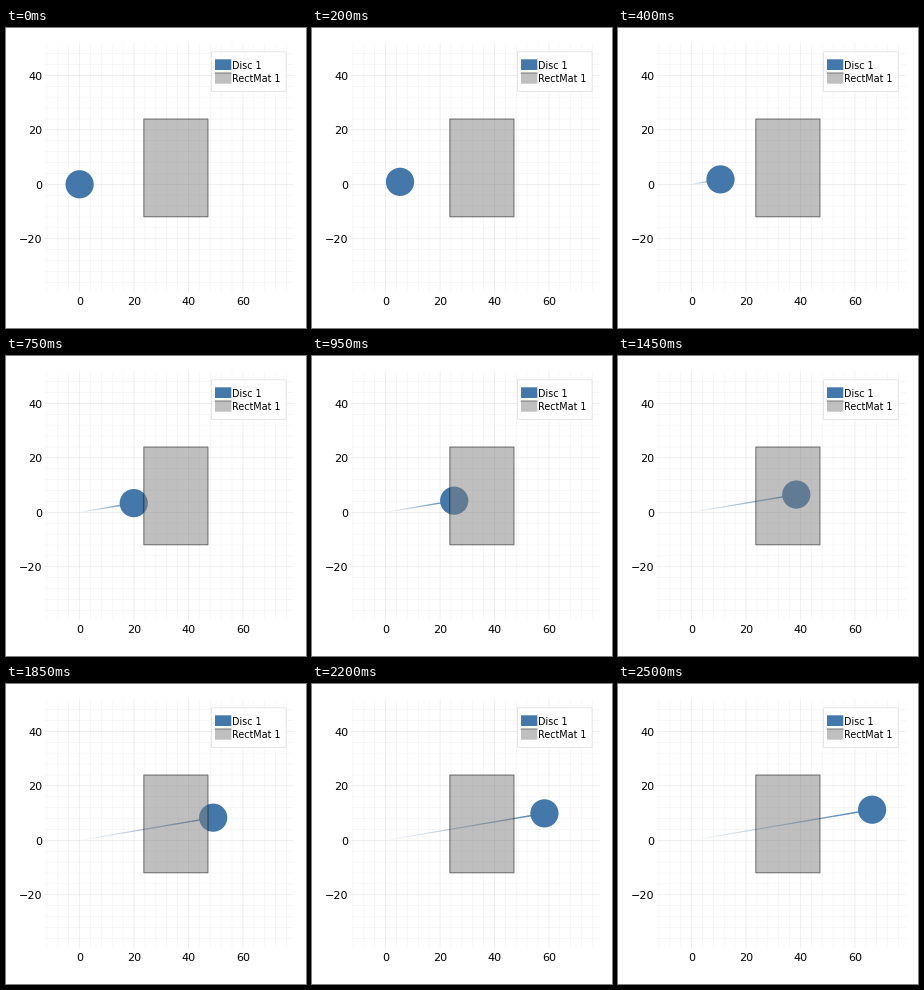
Write a matplotlib script that moves like this. It is 300 px wide and 300 px high and loops after 2550 ms.

```python
import numpy as np
import matplotlib.pyplot as plt
from matplotlib.animation import FuncAnimation
from matplotlib.collections import LineCollection
from matplotlib.patches import Circle, Rectangle

FRAMES, INTERVAL = 51, 50
PT = 0.72                       # points per pixel at 100 dpi
X0, Y0, UNIT = 73.6, 156.3, 2.722
STEP = np.array([3.61, -0.612])  # disc travel per frame, pixels
BLUE = "#4477AA"

plt.rcParams["font.family"] = "DejaVu Sans"
fig = plt.figure(figsize=(3, 3), dpi=100, facecolor="white")
ax = fig.add_axes([0, 0, 1, 1])
ax.set_xlim(0, 300)
ax.set_ylim(300, 0)
ax.axis("off")


def px(x):
    return X0 + UNIT * x


def py(y):
    return Y0 - UNIT * y


def line(xs, ys, color, width, **kw):
    ax.plot(xs, ys, color=color, lw=width * PT, solid_capstyle="butt",
            snap=False, **kw)


def label(x, y, text, size, ha):
    ax.text(x, y, text, fontsize=size * PT, ha=ha, va="baseline", zorder=8)


def box(x, y, w, h, **kw):
    ax.add_patch(Rectangle((x, y), w, h, snap=False, **kw))


# Grid: minor lines every 4 units, major every 20
for k in range(-3, 20):
    shade = 0.1 if k % 5 == 0 else 0.05
    line([px(4 * k)] * 2, [15, 264], "black", 0.6, alpha=shade, zorder=1)
for k in range(-9, 13):
    shade = 0.1 if k % 5 == 0 else 0.05
    line([39, 288], [py(4 * k)] * 2, "black", 0.6, alpha=shade, zorder=1)

for v in (0, 20, 40, 60):
    label(px(v), 277, str(v), 11.1, "center")
for v in (-20, 0, 20, 40):
    label(36.3, py(v) + 4.3, str(v).replace("-", "\u2212"), 11.1, "right")

# Moving parts
trail = LineCollection([], capstyle="butt", zorder=2)
ax.add_collection(trail)
disc = Circle((X0, Y0), 14.1, facecolor=BLUE, edgecolor="none", zorder=3)
ax.add_patch(disc)

# Translucent block over the disc
box(137.8, 91, 64.2, 97.8, facecolor=(0.5, 0.5, 0.5, 0.5),
    edgecolor=(0, 0, 0, 0.5), lw=PT, joinstyle="miter", zorder=4)

# Legend
box(205.5, 23.8, 74.6, 39.6, facecolor="white", edgecolor="#e4e4e4",
    lw=0.9 * PT, zorder=6)
box(209, 31.3, 16.3, 10.7, facecolor=BLUE, edgecolor="none", zorder=7)
box(209, 45, 16.3, 10.7, facecolor="#bfbfbf", edgecolor="none", zorder=7)
line([208.7, 225.5], [45, 45], "#777777", 1, zorder=7)
label(226.5, 40.8, "Disc 1", 9.7, "left")
label(226.5, 54.2, "RectMat 1", 9.7, "left")


def update(i):
    start = np.array([X0, Y0])
    path = start + np.arange(i + 1)[:, None] * STEP
    disc.center = path[-1]
    ramp = np.arange(1, i + 1) / max(i, 1)
    trail.set_segments(list(np.stack([path[:-1], path[1:]], axis=1)))
    trail.set_linewidths((0.8 + 0.7 * ramp) * PT if i else [0])
    rgb = np.array([0x44, 0x77, 0xAA]) / 255
    trail.set_color([(*rgb, a) for a in ramp])
    return trail, disc


anim = FuncAnimation(fig, update, frames=FRAMES, interval=INTERVAL,
                     repeat=True, repeat_delay=0, blit=False)
plt.show()
```
